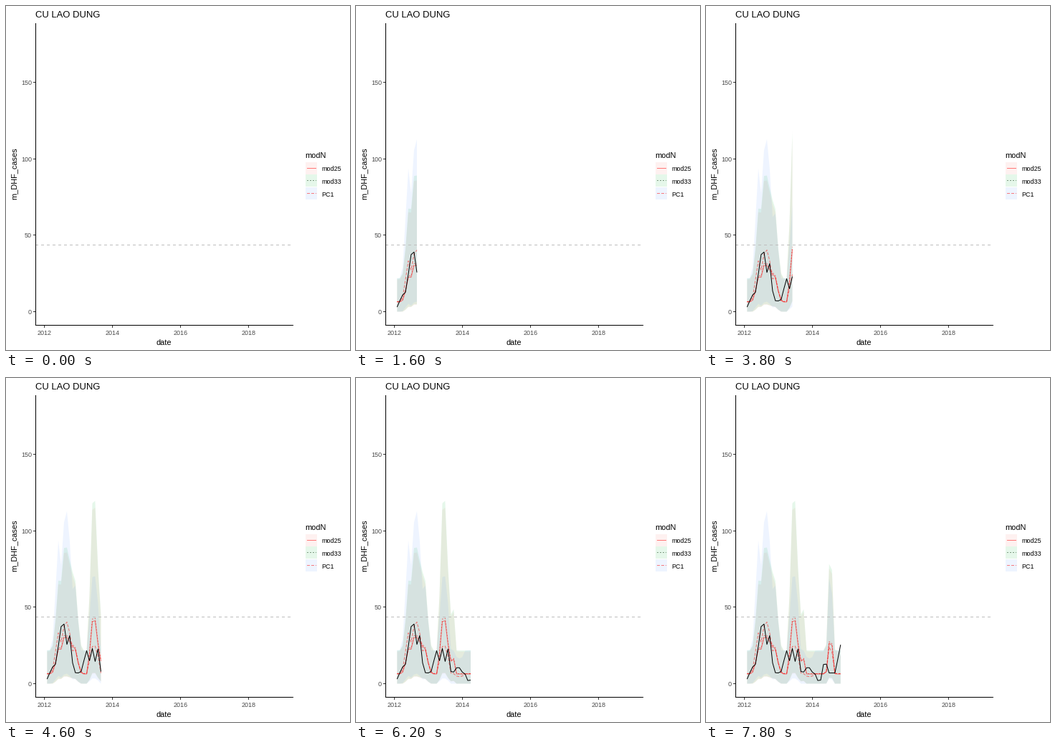
Write a matplotlib script that moves like this. It is 480 px wide and 480 px high and loops after 8000 ms.

```python
import numpy as np
import matplotlib.pyplot as plt
from matplotlib.animation import FuncAnimation
from matplotlib.patches import Polygon, Rectangle

plt.rcParams["font.family"] = ["Liberation Sans", "DejaVu Sans"]

SIZE, DPI = 480, 100
PX = 72 / DPI                      # one pixel in points
FRAMES, STEP = 40, 200
PINK, GREEN, BLUE = "#F8766D", "#00BA38", "#619CFF"
DOTTED, DASHED = (2, 2), (4, 2)

# Month ends, in days since 2012-01-01
start = np.datetime64("2012-01-01")
months = np.arange("2012-02", "2014-12", dtype="datetime64[M]")
days = (months.astype("datetime64[D]") - start).astype(int) - 1
marks = np.round(99 * (days - 30) / 2526)   # frame at which each month is reached
index = np.arange(len(days))


def px(day):
    return 53.4 + 0.13 * np.asarray(day, float)


def py(value):
    return 426.5 - 2.133 * np.asarray(value, float)


def season(base, *bumps):
    """Monthly values: a base level plus flat-topped bumps (centre, height, width)."""
    return base + sum(h * np.exp(-((index - c) / w) ** 4) for c, h, w in bumps)


mean25 = season(6.3, (7, 24, 3.8), (5, -6, 0.5), (8.7, -4, 0.9),
                (16.6, 35, 1.6), (19.6, 10, 0.9), (29.4, 20.5, 1.1))
mean33 = 1.04 * mean25
mean_pc = season(6.6, (6, 31, 3.2), (5, -10, 0.5), (7, 3, 0.5), (10.2, 13, 0.9),
                 (16.6, 18, 1.7), (22, -2, 1.5), (29.3, 17.5, 1))
observed = season(7, (0, -4, 0.6), (2.4, 4, 1), (6.2, 32, 2.5), (7, -13, 0.5),
                  (15.5, 16, 2.7), (15, -8, 0.5), (17, -7, 0.5), (18, 8, 0.5),
                  (21.5, 3.5, 1.3), (25.4, -5, 1.2), (27.5, 7.5, 0.7),
                  (33.3, 18.5, 1.4))


def band(mean):
    """Lower and upper limits around a mean."""
    return np.maximum(0, 0.2 * mean - 1.5), 2.7 * mean + 4


fig = plt.figure(figsize=(SIZE / DPI, SIZE / DPI), dpi=DPI, facecolor="white")
ax = fig.add_axes([0, 0, 1, 1])
ax.set_xlim(0, SIZE)
ax.set_ylim(SIZE, 0)
ax.axis("off")


def line(xs, ys, color, dash=None, **kw):
    return ax.plot(xs, ys, color=color, lw=PX, ls=(0, dash) if dash else "-",
                   snap=False, solid_capstyle="butt", dash_capstyle="butt",
                   **kw)[0]


def label(x, y, text, size, color="black", **kw):
    kw.setdefault("va", "baseline")
    ax.text(x, y, text, fontsize=size * PX, color=color, **kw)


models = (("mod25", mean25, PINK, "#FF7878", None),
          ("mod33", mean33, GREEN, "#7F9A82", DOTTED),
          ("PC1", mean_pc, BLUE, "#F77B80", DASHED))

# Ribbons, curves and legend keys
ribbons, curves = [], []
label(417.5, 212, "modN", 11)
for i, (name, mean, fill, stroke, dash) in enumerate(models):
    area = ax.add_patch(Polygon([(0, 0)] * 3, fc=fill, alpha=0.1, lw=0, zorder=1))
    ribbons.append((area, *band(mean)))
    curves.append((line([], [], "red", dash, alpha=0.5, zorder=3), mean))

    y = round(218 + 17.28 * i)
    ax.add_patch(Rectangle((418, y), 16, 17, fc=fill, alpha=0.1, lw=0))
    line([420, 433], [y + 8.5, y + 8.5], stroke, dash)
    label(440.5, y + 12.5, name, 9)
curves.append((line([], [], "black", zorder=4), observed))

# Axes
line([41, 401], [333.5, 333.5], "#BEBEBE", (4, 4), zorder=5)
line([41.5, 41.5], [24, 446], "black", zorder=6)
line([41, 401], [445.5, 445.5], "black", zorder=6)
for value in range(0, 151, 50):
    y = np.floor(py(value)) + 0.5
    line([38, 41], [y, y], "#333333")
    label(36, y + 3.5, str(value), 9, "#4D4D4D", ha="right")
for year in range(2012, 2019, 2):
    x = np.floor(px((np.datetime64(f"{year}-01-01") - start).astype(int))) + 0.5
    line([x, x], [446, 449], "#333333")
    label(x, 459, str(year), 9, "#4D4D4D", ha="center")

label(41, 16.5, "CU LAO DUNG", 13)
label(220.5, 473, "date", 11, ha="center")
label(16, 233.5, "m_DHF_cases", 11, rotation=90, ha="right", va="center")


def reveal(data, pos):
    """Values up to a fractional month position."""
    return np.append(data[index < pos], np.interp(pos, index, data))


def update(frame):
    pos = np.interp(frame, marks, index)
    x = px(reveal(days, pos))
    for curve, data in curves:
        curve.set_data(x, py(reveal(data, pos)))
    for area, low, top in ribbons:
        upper = np.column_stack([x, py(reveal(top, pos))])
        lower = np.column_stack([x, py(reveal(low, pos))])
        area.set_xy(np.vstack([upper, lower[::-1]]))
    return [c for c, _ in curves] + [r[0] for r in ribbons]


anim = FuncAnimation(fig, update, frames=FRAMES, interval=STEP,
                     repeat=True, repeat_delay=0, blit=False)
plt.show()
```
